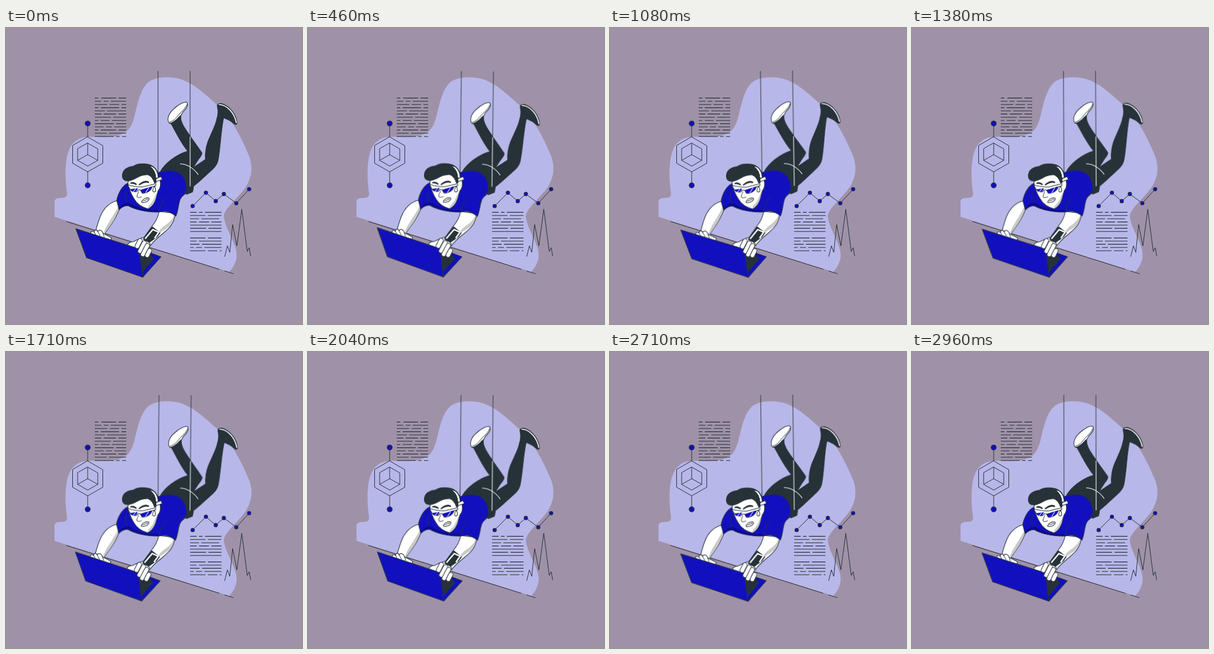
Write an HTML page that moves like this. It is 500 px wide and 500 px high and loops after 3 s.

```html
<!DOCTYPE html>
<html lang="en">
<head>
<meta charset="utf-8">
<title>Suspended with a laptop</title>
<style>
  html, body { margin: 0; width: 100%; height: 100%; overflow: hidden; background: #9f92a8; }
  svg { display: block; width: 100%; height: 100%; }
  #figure { transform-origin: 254px 247px; }
  .line { fill: none; stroke: #263238; stroke-width: 1; stroke-linejoin: round; stroke-linecap: round; }
  .light { fill: none; stroke: #fff; stroke-width: 1.1; stroke-linecap: round; }
  .dark { fill: #263238; }
  .blue { fill: #1210be; }
  .navy { fill: #0c0a8c; }
  .grey { fill: #c9c9c9; }
  .white { fill: #fff; }
  .edge { stroke: #263238; stroke-width: 1.1; stroke-linejoin: round; }
</style>
</head>
<body>
<svg viewBox="0 0 500 500">
  <path fill="#b8b7e9" d="M82 319V294C82 288 87 287 94 287C101 287 104 284 103 278C100 257 99 228 105 210C110 194 121 185 137 184C155 183 177 187 194 180C208 175 213 164 217 149C223 125 227 104 240 92C250 83 270 82 284 84C313 88 335 111 358 131C379 150 396 181 411 217C418 238 414 253 406 267C394 286 367 306 368 319C371 343 394 369 389 390C387 400 381 408 377 412Z"/>

  <g id="notes" class="line" style="stroke-linecap:butt;stroke-width:1.1"></g>

  <g class="line">
    <path d="M138 161V184M138 243V266M138 184L163.5 198.8V228.4L138 243L112.5 228.4V198.8Z"/>
    <path d="M138 194.5L155 204.2V223.5L138 233.3L121 223.5V204.2ZM138 194.5V214L121 223.5M138 214L155 223.5"/>
    <path d="M102.5 327L360 407.5M369.5 410.5L384 415"/>
    <path d="M369.5 386L374 368L378 379L382.8 332L390 368L398.3 306L407.5 377.5L410.8 371L413.3 385"/>
  </g>
  <g id="chart"></g>

  <g id="figure">
    <path class="line" d="M256.8 73V250M311 73V186"/>

    <!-- legs and shoes -->
    <path class="dark edge" d="M278 160L295 150C295 161 304 172 312 184C319 194 325 202 331 211C331 215 328 218 325 222L316 236L337 222C336 212 338 201 341 192C347 177 355 163 357 150L368 150C363 171 363 196 358.5 222C357 232 350 238 343 244C333 253 325 261 317 267L315 277L305 281L286 262L261 242C268 230 286 214 307 208C296 195 289 180 278 160Z"/>
    <path class="white edge" d="M275.5 160.5C271 154 275 144 283 137C290 130 301 124 305 125.5C308.500 128 306 135 301 139.500C295 145 298 147 293 151C287 158 280 164 275.500 160.500Z"/>
    <path class="dark" d="M276 160.500C285 159 290 151 295 147L296 152L280 163Z"/>
    <path class="line" d="M276.500 159C285 157 289 149 294 144C299 139 304 134 306 129"/>
    <path class="dark edge" d="M357 133C356 128 361 126 368 129C379 134 389 147 390 159C391 164 387 164 383 160C377 154 371 154 367 151L356 155C358 148 359 140 357 133Z"/>
    <path class="light" style="stroke-width:1.6" d="M360 129.300C374 130 386 144 389 160"/>
    <path class="light" d="M311 184V267M294.500 229.500C307 230 318 238 324.500 247.500"/>

    <!-- arms -->
    <path class="white edge" d="M189 291.500C174 294 164 306 159 319C155 329 153 337 151 345L165 351C169 342 179 332 185 320C188 314 190 310 192 305Z"/>
    <path class="grey" d="M189 303C184 311 181 317 175 326C170 334 166 341 164 349L166 349C169 342 179 332 184.500 320C188 313 190 309 191 304Z"/>
    <path class="white edge" d="M258.500 310C257 322 250 330 245 337L229 360L244 368C252 354 275 343 281 330C284 324 286 318 285 313Z"/>
    <path class="grey" d="M283 318C278 329 267 333 260 341L257 348C267 341 277 336 280.500 329C283 324 285 320 284.500 315Z"/>

    <!-- shirt -->
    <path class="blue edge" d="M206 262C196 267 190 278 187 291L191 307C195 303 201 300 206 300C220 308 237 311 259 311C269 307 279 311 287 318C292 306 291 295 295 288C298 282 306 281 306 271C305 257 298 246 289 243C279 239 266 240 255 245Z"/>
    <path class="navy" d="M191 306C194 299 199 295 208 295C221 304 239 309 256 307L259 310.500C238 310.500 220 307 207 299.500C200 299 195 302 191 306Z"/>
    <path class="line" d="M205 276C201 283 201 288 206 294M270 286C263 293 260 302 259 310M304 264C306 270 305 277 299 281"/>
    <path class="dark" d="M305 274L317 267L316 276L307 280Z"/>

    <!-- head -->
    <path class="white edge" d="M206 260C206 268 211 280 216 288C221 297 230 303 240 305.500C247 302 252 294 254 284L257 275C261 271 262 263 260 257C257 249 248 243 238 244C225 245 213 252 206 260Z"/>
    <path class="grey" d="M256 276C251 282 250 293 241 300L239 305C247 302 252 294 254 284Z"/>
    <path class="dark edge" d="M199 256C195 252 196 244 201 239C205 235 211 234 215 233.500C223 228 239 228 247 233C255 238 258 247 257 256L251 262C249 256 246 250 240 248C231 247 224 251 217 255C209 259 202 259 199 256Z"/>
    <path class="white edge" d="M243 234C250 232 257 242 257 253L253 254C253 244 249 238 243 234Z"/>
    <path class="white edge" d="M250 256L262 251L264 256L252 260Z"/>
    <path class="dark" d="M250 253L254 252L254 262L251 262Z"/>
    <path class="dark" d="M210 261.500C214 259 218 261 221 263.500L220 265.500C216 263 213 263 210 263ZM224 264.500C229 259 237 256 242 260L241 262C235 260 230 263 225 266Z"/>
    <path class="white edge" d="M205.500 265C214 267 226 270 233 268L253 263L253 266.500L247 268C245 275 237 280 230 279L227 273.500L223 273.500C221 278 214 278 210 273Z"/>
    <path class="blue" d="M209.500 272.500L222.500 270.500C221.500 277.500 214 278.500 209.500 272.500ZM227 273.500L246.500 267.500C245 275.500 237 279.500 230 278.700Z"/>
    <path class="light" d="M215 276.500L219 271.500M236 278L241 270"/>
    <path class="line" d="M224 276C223 280 220 284 222 286C225 287 227 286 229 285"/>
    <path class="white edge" d="M229 294C230 290 235 286 241 287C244 289 239 294 234 294.500C231 295 229 295 229 294Z"/>
    <path class="line" d="M232 292L240 289"/>
    <path class="white edge" d="M251 267C247 272 247 277 250 277C254 277 253 272 251 267Z"/>

    <!-- laptop -->
    <path class="blue edge" d="M225 373L262 386.500L231 421Z"/>
    <path class="dark" d="M225 373L241 379L250 390L230 413Z"/>
    <path class="white edge" d="M206 369C204 363 211 361 215 361L225 356L234 353L244 365L231 378L217 372Z"/>
    <path class="white edge" d="M144 349C142 344 145 342 149 345C149 340 154 340 155 344C157 339 163 342 164 347C169 350 176 352 178 355C178 359 171 359 166 356L145 350Z"/>
    <path class="line" d="M149 345L152 350M155 344L159 351M164 347L166 353"/>
    <path class="blue edge" d="M118 339L225 373L231 421L136 388Z"/>

    <!-- wrist device and gripping fingers -->
    <path class="dark" d="M247 335L261 346L256 353L246 360L242 363L231 357L236 349Z"/>
    <path fill="none" stroke="#fff" stroke-width="2.4" d="M235 356L240 350L248 340.500L258 345L251 355"/>
    <g id="fingers"></g>
  </g>
</svg>
<script>
  const make = (parent, tag, attrs) => {
    const el = document.createElementNS("http://www.w3.org/2000/svg", tag);
    for (const key in attrs) el.setAttribute(key, attrs[key]);
    return document.getElementById(parent).appendChild(el);
  };

  // dash, gap, dash ... across each 53 px row
  const rows = [
    "6 5 25 4 13", "11 4 8 4 26", "21 4 16 4 8", "6 4 31 4 8", "17 4 32",
    "11 4 21 4 13", "27 4 22", "6 4 15 4 24", "32 4 17", "15 4 10 4 20",
    "6 4 26 4 13", "20 4 29", "32 4 6 4 7"
  ];
  const note = (x, y, list) => list.forEach((dash, i) => dash && make("notes", "path", {
    d: `M${x} ${y + i * 5.4}h53`, "stroke-dasharray": dash + " 99"
  }));
  note(150, 118.4, rows);
  note(311, 311.4, [
    "11 4 6 4 28", "26 4 23", "15 4 30 4", "11 4 17 4 17", "53", "27 4 22",
    "53", "", "26 4 23", "11 4 38", "16 4 33", "6 4 10 4 29", "26 4 16 4 3"
  ]);

  const dot = (parent, [cx, cy], r) => make(parent, "circle", { cx, cy, r, class: "blue edge" });
  const points = [[315.3, 300.7], [337.7, 278.3], [354.3, 292.4], [368, 280.4], [389, 296], [410.7, 272.3]];
  make("chart", "polyline", { points: points.join(" "), class: "line" });
  points.forEach(p => dot("chart", p, 3));
  [[138, 161.3], [138, 265.8]].forEach(p => dot("chart", p, 4.3));

  // centre, half length
  [[224, 364, 9], [230, 370, 11.5], [235, 375, 12], [240.5, 380, 8]].forEach(([x, y, len]) =>
    make("fingers", "rect", {
      x: x - 3.7, y: y - len, width: 7.4, height: len * 2, rx: 3.7,
      class: "white edge", transform: `rotate(27 ${x} ${y})`
    }));

  const sway = [[0, 0], [.25, 1], [.75, -1], [1, 0]];
  document.getElementById("figure").animate(
    sway.map(([offset, deg]) => ({ offset, transform: `rotate(${deg}deg)` })),
    { duration: 1500, iterations: Infinity, easing: "linear" }
  );
</script>
</body>
</html>
```
